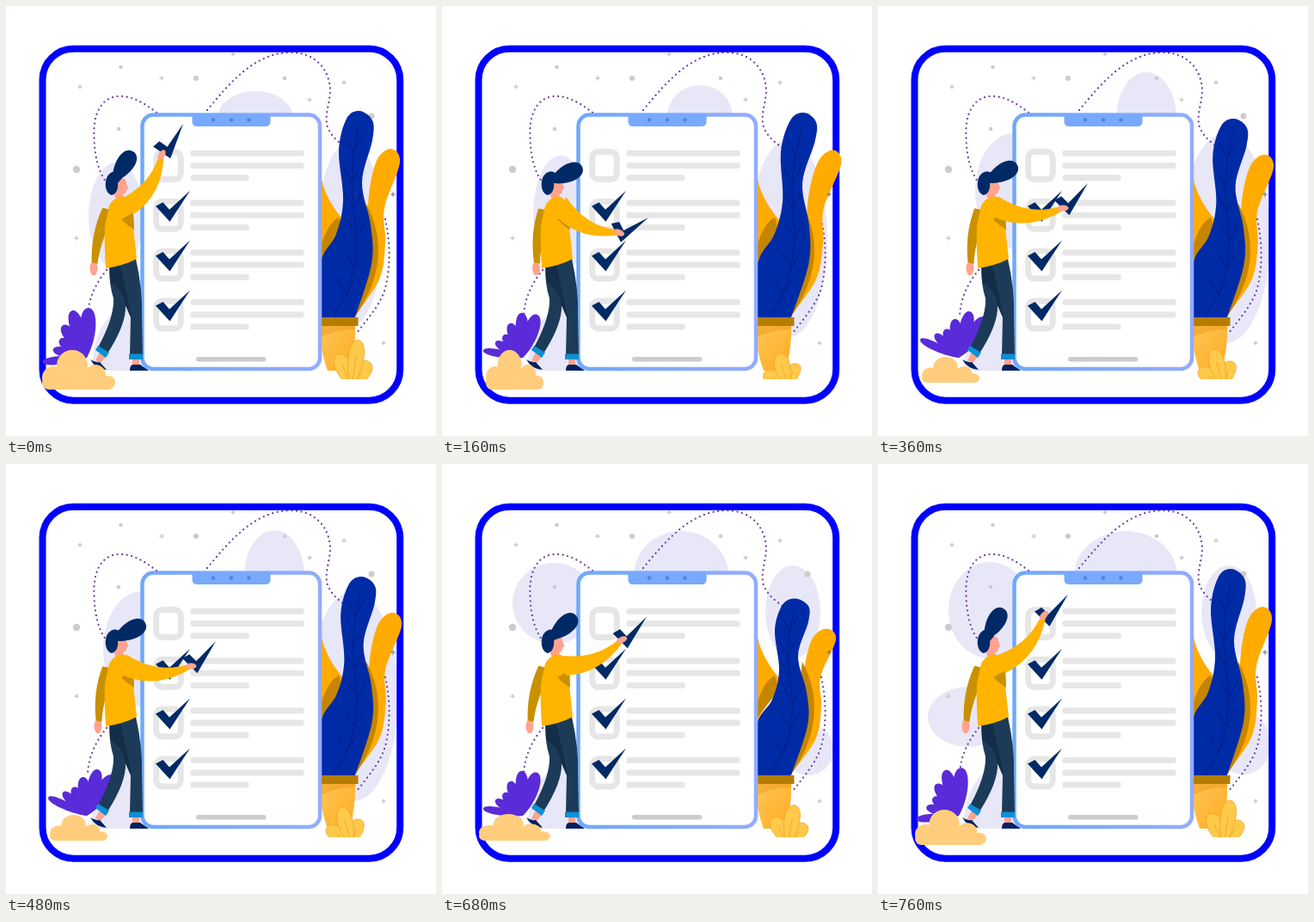
An HTML page for the animation above (800 ms loop, 500x500 px).

```html
<!DOCTYPE html>
<html lang="en">
<head>
<meta charset="utf-8">
<title>Checklist</title>
<style>
  html, body { margin: 0; width: 100%; height: 100%; overflow: hidden; background: #fff; }
  svg { display: block; width: 100vw; height: 100vh; }
  .dotted { fill: none; stroke: #6b3fa0; stroke-width: 2.3; stroke-linecap: round; stroke-dasharray: 0 5.6; }
</style>
</head>
<body>
<svg viewBox="0 0 500 500">
  <defs>
    <linearGradient id="edge">
      <stop offset="0" stop-color="#70a8fa"/><stop offset="1" stop-color="#93acff"/>
    </linearGradient>
    <linearGradient id="clay" x2="1" y2="1">
      <stop offset="0" stop-color="#ffc65a"/><stop offset="1" stop-color="#ffab1c"/>
    </linearGradient>
    <clipPath id="ground"><rect width="500" height="434"/></clipPath>
    <path id="tick" fill="#002a66" d="M0 0L-23.500 36L-40 18L-31.500 13.500L-24 22Z"/>
  </defs>

  <g fill="#e8e7f8">
    <path d="M100 424C100 385 112 352 165 335V424Z"/>
    <g id="blobs"></g>
  </g>
  <g id="sky" fill="#ccc"></g>
  <path class="dotted" d="M175 124C160 112 145 104 130 105C109 107 101 128 102.500 153C103 176 108 193 116 204M117 307C104 323 95 342 95 363"/>
  <path class="dotted" d="M234 121C262 87 290 55 330 54C362 54 377 76 377 100C376 115 370 128 374 141C380 155 390 160 398 167M441 248C447 275 447 300 442 324C438 344 422 362 408 380"/>
  <rect x="42.500" y="49.700" width="415.700" height="409" rx="36" fill="none" stroke="#00f" stroke-width="8"/>

  <path fill="#ffab00" d="M366 195Q369 222 393 250L366 300Z"/>
  <path fill="#c58500" d="M366 296V280Q374 252 387 246L392 262Z"/>
  <path id="gold" fill="#ffab00"/>
  <path fill="#c58500" d="M404 364Q453 295 419 230L410 300Z"/>
  <path id="blue" fill="#002ba6"/>
  <path id="veins" fill="none" stroke="#001f8c" stroke-width="1.200"/>
  <path fill="url(#clay)" d="M366 371H406Q407 400 399 424H374Q367 405 366 390Z"/>
  <path fill="#e99a1a" opacity=".5" d="M366 371H406V376Q385 376 366 385Z"/>
  <rect x="364" y="362" width="45.500" height="10" fill="#b37d00"/>
  <g clip-path="url(#ground)"><g id="sprout" fill="#ffc94a" stroke="#f0a426" stroke-width=".8"></g></g>
  <path d="M450 215l1 3 3 1-3 1-1 3-1-3-3-1 3-1z" opacity=".25"/>

  <rect x="158.500" y="126.500" width="206.500" height="295.500" rx="13" fill="#fff" stroke="url(#edge)" stroke-width="4.500"/>
  <path fill="#77a9fd" d="M216.500 126H307.500V135Q307 140 302 140H222Q217 140 216.500 135Z"/>
  <path stroke="#4b86de" stroke-width="4.600" stroke-linecap="round" d="M241 132.500h0M262 132.500h0M282.500 132.500h0"/>
  <rect x="221" y="408" width="81.500" height="5.500" rx="2.700" fill="#ccc"/>
  <g id="rows"></g>

  <g id="bush" fill="#5a2bd8"></g>

  <ellipse id="backHand" cy="305" rx="4.500" ry="8.500" fill="#ffa38e"/>
  <path id="backArm" fill="#c99000"/>
  <g fill="#ffa38e">
    <path d="M110 401L118 406L110 415L104 412ZM147 409H155V419H147Z"/>
    <path d="M127 207C132 198 140 199 140 206L142.500 212L140 214C140 219 137 219 136 219L138 225Q131 230 126 221Z"/>
  </g>
  <path fill="#002060" d="M98 411Q104 415 109 414L117 423Q104 422 98 411ZM144 424Q144 417 148 417H156L166 424Z"/>
  <path fill="#1c3b58" d="M120 303L151 294Q159 330 158 360L159 406H144L145 362L139 348Q140 370 118 404L107 397Q126 362 125 340Q120 325 120 303Z"/>
  <path fill="#142d48" d="M121 305L133 302Q140 330 146 364L139 348Q136 330 121 320Z"/>
  <path fill="#0c8fd6" d="M107 395L120 403L116 409L104 400ZM143 404.500H159V411H143Z"/>
  <path fill="#ffb400" d="M120 232C126 222 135 219 141 224Q150 234 148.500 262L152 294Q137 302 116 305Q114 276 115 255Z"/>
  <path fill="#c99000" d="M134 248L148 240L149 260Q142 256 134 248Z"/>
  <use id="pen" href="#tick"/>
  <path id="arm" fill="#ffb400"/>
  <ellipse id="hand" rx="6.500" ry="3.600" fill="#ffa38e"/>
  <g fill="#002a66">
    <path d="M117 200C121 190 133 190 135 200L130 206C131 212 128 219 123 220C116 218 114 208 117 200Z"/>
    <g id="tuft"></g>
  </g>

  <g id="cloud" fill="#ffcd7b">
    <circle cx="13" cy="32" r="13"/><circle cx="35" cy="18" r="18"/><circle cx="62" cy="29" r="12"/>
    <rect x="14" y="26" width="50" height="20"/><rect y="30" width="85" height="16" rx="8"/>
  </g>
</svg>
<script>
const $ = id => document.getElementById(id);
const set = (id, name, value) => $(id).setAttribute(name, value);
const points = text => text.split(' ').map(pair => pair.split(',').map(Number));
const repeat = (count, make) => Array.from({ length: count }, (_, k) => make(k)).join('');

// Closed smooth curve through the points; a doubled point makes a corner.
function smooth(p) {
  const n = p.length, at = i => p[(i + n) % n];
  let d = `M${p[0]}`;
  for (let i = 0; i < n; i++) {
    const [a, b, c, e] = [at(i - 1), at(i), at(i + 1), at(i + 2)];
    d += `C${b.map((v, k) => v + (c[k] - a[k]) / 6)} ${c.map((v, k) => v - (e[k] - b[k]) / 6)} ${c}`;
  }
  return d + 'Z';
}

// Bends tall leaves: the base stays, the tip moves by (dx, dy).
const sway = (p, [dx, dy]) => p.map(([x, y]) => {
  const w = (Math.max(0, 362 - y) / 238) ** 1.5;
  return [x + dx * w, y + dy * w];
});

// Tapered curved limb from a to b with half widths wa and wb.
function limb([ax, ay], [bx, by], bend, wa, wb) {
  const dx = bx - ax, dy = by - ay, length = Math.hypot(dx, dy);
  const nx = -dy / length, ny = dx / length, wm = (wa + wb) / 2;
  const cx = (ax + bx) / 2 - dy * bend, cy = (ay + by) / 2 + dx * bend;
  const off = (x, y, w) => `${x + nx * w} ${y + ny * w} `;
  return `M${off(ax, ay, wa)}Q${off(cx, cy, wm)}${off(bx, by, wb)}`
    + `L${off(bx, by, -wb)}Q${off(cx, cy, -wm)}${off(ax, ay, -wa)}Z`;
}

const leaf = (angle, length, width) =>
  `<path transform="rotate(${angle})" d="M0 0C${-width} ${-length * .4} ${-width} ${-length} 0 ${-length}S${width} ${-length * .4} 0 0"/>`;

const stars = points('86,94 181,84 264,56 353,109 393,89 450,219 82,270 439,392');
const specks = points('133.5,71,2.3 221,84,3 324,84,2.3 131,143,2.3 82,190,4.2 425,128,3.5');
$('sky').innerHTML =
  stars.map(([x, y]) => `<path d="M${x} ${y - 3.5}l1 2.500 2.500 1-2.500 1-1 2.500-1-2.500-2.500-1 2.500-1z"/>`).join('') +
  specks.map(([x, y, r]) => `<circle cx="${x}" cy="${y}" r="${r}"/>`).join('');

const bar = (y, width) => `<rect x="214.500" y="${y}" width="${width}" height="7" rx="2.500" fill="#e6e6e6"/>`;
$('rows').innerHTML = repeat(4, i => {
  const y = i * 57.8;
  return `<rect x="174.700" y="${169.5 + y}" width="28.500" height="32" rx="7" fill="none" stroke="#e6e6e6" stroke-width="7"/>`
    + bar(167.7 + y, 132) + bar(182 + y, 132) + bar(196.2 + y, 68)
    + (i ? `<use href="#tick" x="214" y="${157 + y}"/>` : '');
});

$('bush').innerHTML = repeat(6, k => leaf(18 - 19.5 * k, 44 + 10 * Math.cos(k * 1.1 - .5), 11 - k));
$('tuft').innerHTML = leaf(0, 43, 14);
$('sprout').innerHTML = [[-22, .75], [34, .65], [8, 1]].map(([angle, size]) =>
  leaf(angle, 56 * size, 12) + `<path transform="rotate(${angle})" d="M0 0V${-38 * size}"/>`).join('');

const blue = points('355,362 355,362 366,297 384,265 392,225 387,168 396,131 411,122 426,133 426,156 414,205 424,255 425,300 405,365 405,365');
const gold = points('404,362 404,362 424,300 421,232 430,182 447,166 458,182 440,235 441,275 434,318');
const spine = points('380,362 396,335 405,305 408,270 404,235 402,205 404,170 410,138');

// pen: tip and turn; bush: turn and size; cloud: box; sway: shift of the tall leaves' tips;
// sprout: turn and height; blobs: centre and radii of each
const poses = [
  { pen: [206, 137, -13], hand: [181, 173], back: 102, tuft: 34, bush: [-16, 1.1], cloud: [42, 400, 85, 46], sway: [0, 0], sprout: [0, 1],
    blobs: [[128, 244, 32, 62], [290, 130, 44, 31], [400, 265, 38, 108]] },
  { pen: [240, 246, 15], hand: [206, 263.5], back: 109.5, tuft: 65, bush: [0, 1], cloud: [51, 400, 67, 46], sway: [9.5, 2], sprout: [-25, .72],
    blobs: [[138, 242, 32, 68], [300, 128, 38, 36], [403, 270, 45, 115]] },
  { pen: [244, 206, -3], hand: [215, 235], back: 107, tuft: 62, bush: [15, 1.06], cloud: [51, 408, 67, 30], sway: [3, 9], sprout: [-25, .82],
    blobs: [[158, 215, 45, 67], [312, 130, 35, 53], [404, 270, 52, 122]] },
  { pen: [238, 177.5, -2], hand: [209, 204.5], back: 102, tuft: 48, bush: [0, 1], cloud: [43, 407, 83, 31], sway: [0, 34], sprout: [0, .85],
    blobs: [[130, 162, 48, 47], [278, 130, 55, 52], [408, 172, 32, 54], [426, 332, 29, 30]] },
  { pen: [221, 151.5, -3], hand: [193, 176], back: 102, tuft: 31, bush: [-15, 1.06], cloud: [43, 402, 83, 41], sway: [0, 0], sprout: [0, .95],
    blobs: [[130, 170, 48, 56], [105, 294, 47, 35], [288, 130, 60, 52], [408, 172, 32, 54], [425, 325, 32, 36]] }
];

function draw({ pen, hand, back, tuft, bush, cloud, sway: shift, sprout, blobs }) {
  const shoulder = [139, 234];
  const reach = Math.atan2(hand[1] - shoulder[1], hand[0] - shoulder[0]) * 180 / Math.PI;
  const veins = sway(spine, shift);
  set('blue', 'd', smooth(sway(blue, shift)));
  set('gold', 'd', smooth(sway(gold, shift)));
  set('veins', 'd', 'M' + veins.join('L')
    + veins.slice(1, -1).map(([x, y]) => `M${x - 10} ${y - 18}L${x} ${y}L${x + 10} ${y - 18}`).join(''));
  set('arm', 'd', limb(shoulder, hand, .25, 13, 3));
  set('hand', 'transform', `translate(${hand}) rotate(${reach})`);
  set('backArm', 'd', limb([121, 237], [back + 1, 299], .12, 9, 3.5));
  set('backHand', 'cx', back);
  set('pen', 'transform', `translate(${pen[0]} ${pen[1]}) rotate(${pen[2]})`);
  set('tuft', 'transform', `translate(124 205) rotate(${tuft})`);
  set('bush', 'transform', `translate(94 409) rotate(${bush[0]}) scale(${bush[1]})`);
  set('cloud', 'transform', `translate(${cloud[0]} ${cloud[1]}) scale(${cloud[2] / 85} ${cloud[3] / 46})`);
  set('sprout', 'transform', `translate(402 444) rotate(${sprout[0]}) scale(1 ${sprout[1]})`);
  $('blobs').innerHTML = blobs.map(([x, y, rx, ry]) =>
    `<ellipse cx="${x}" cy="${y}" rx="${rx}" ry="${ry}"/>`).join('');
}

let shown = -1;
function frame() {
  const time = performance.now() % 800;
  const index = Math.floor((time + 40) / 200);
  if (index !== shown) draw(poses[shown = index]);
  requestAnimationFrame(frame);
}
frame();
</script>
</body>
</html>
```
